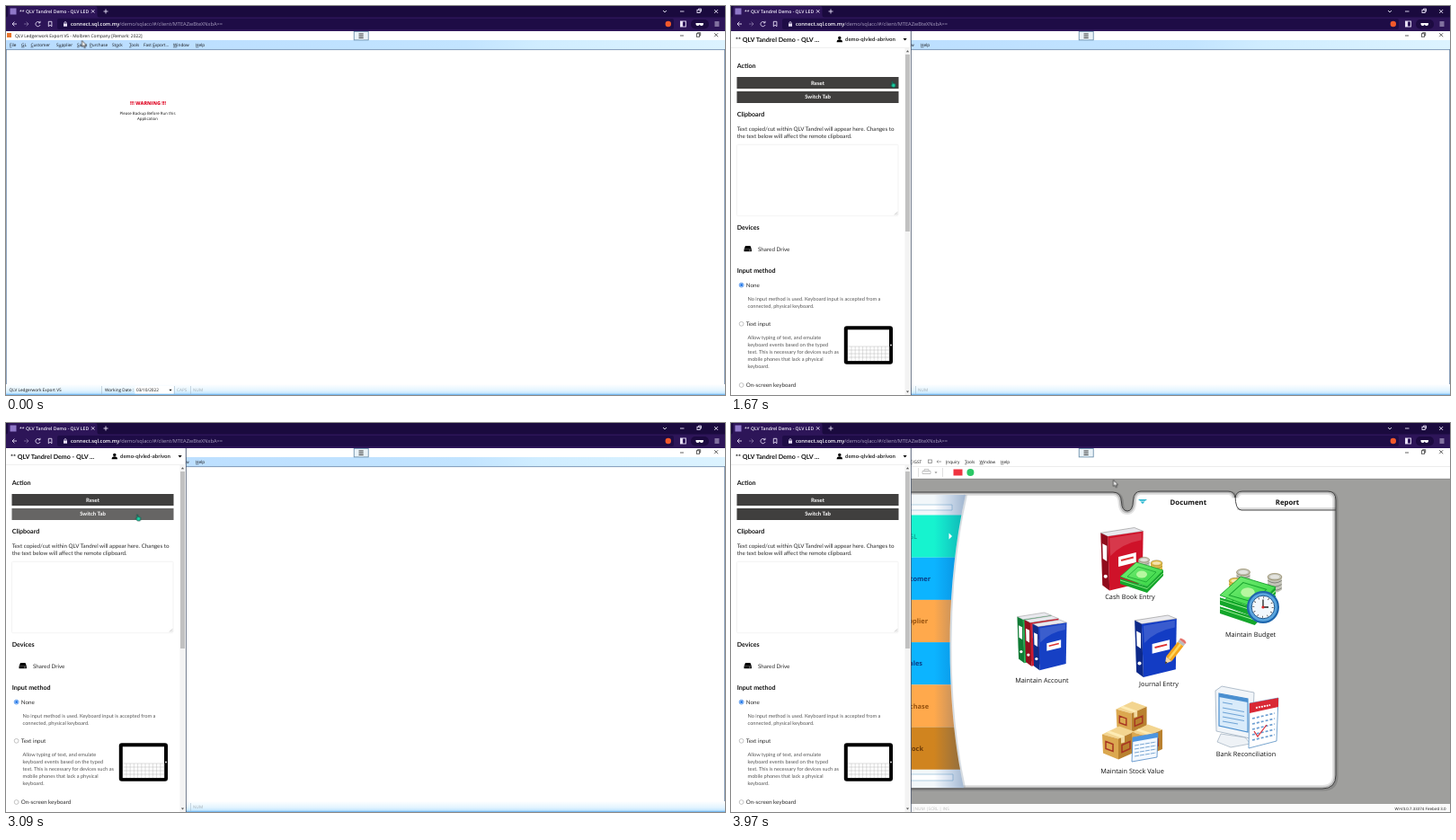
An HTML page that plays this animation: 800 by 433 pixels, repeating every 4300 ms.

```html
<!DOCTYPE html>
<html lang="en">
<head>
<meta charset="utf-8">
<title>Remote desktop demo</title>
<style>
html, body { margin: 0; width: 100%; height: 100%; overflow: hidden; background: #fff; }
svg { display: block; width: 800px; height: 433px; }
text { font-family: 'Open Sans', sans-serif; font-size: 4.7px; fill: #111; text-rendering: geometricPrecision; white-space: pre; }
.u { text-decoration: underline; text-decoration-thickness: .4px; }
.b { font-weight: 700; }
.mid { text-anchor: middle; }
.end { text-anchor: end; }
.line { fill: none; stroke: currentColor; }
#panel text { font-family: Lato, sans-serif; font-size: 6.25px; fill: #2c2c2c; }
#panel .h { font-size: 7.1px; font-weight: 700; fill: #111; }
#panel .s { font-size: 5.65px; fill: #555; }
#panel .btn { font-size: 6px; font-weight: 700; fill: #fff; text-anchor: middle; }
#desk .cap { font-size: 7.3px; text-anchor: middle; }
#desk .tab { font-size: 7.8px; font-weight: 700; text-anchor: middle; }
#desk .side { font-size: 7.4px; font-weight: 700; text-anchor: end; }

.anim { animation: 4300ms step-end infinite; }
#panel { animation-name: slide; }
#desk { animation-name: swap; }
#menuBtn { animation-name: press; }
#switch { animation-name: hover; }
#cursor { animation-name: travel; animation-timing-function: linear; }
#arrow { animation-name: arrow; }
#tealHand { animation-name: teal; }
#whiteHand { animation-name: white; }
@keyframes slide {
  0% { transform: translateX(-202px); opacity: 0; }
  28.84% { transform: translateX(-184px); opacity: .1; }
  29.53% { transform: translateX(-156px); opacity: .26; }
  30.23% { transform: translateX(-100px); opacity: .55; }
  30.93% { transform: translateX(-50px); opacity: .8; }
  32.33%, 100% { transform: none; opacity: 1; }
}
@keyframes swap { 0% { opacity: 0; } 73.95%, 100% { opacity: 1; } }
@keyframes press { 0% { fill: #eaf3f8; } 17% { fill: #bcc4d0; } 36.5%, 100% { fill: #eaf3f8; } }
@keyframes hover { 0% { fill: #403f3e; } 40.2% { fill: #666564; } 76.05%, 100% { fill: #403f3e; } }
@keyframes travel {
  0%, .7% { transform: translate(84.5px, 38.5px); }
  6% { transform: translate(260px, 60px); }
  10.2% { transform: translate(436px, 62px); }
  12.8% { transform: translate(419px, 49px); }
  22.56%, 36.05% { transform: translate(400px, 37.5px); }
  38.84% { transform: translate(177.5px, 83px); }
  41.63%, 45.12% { transform: translate(151px, 110px); }
  47.9%, 73.95% { transform: translate(144px, 101.5px); }
  80.23%, 81.16% { transform: translate(275.5px, 121.5px); }
  82.56%, 83.26% { transform: translate(290px, 122px); }
  92.3%, 100% { transform: translate(425.5px, 63.5px); }
}
@keyframes arrow { 0% { opacity: 1; } 17% { opacity: 0; } 87%, 100% { opacity: 1; } }
@keyframes teal { 0% { opacity: 0; } 17% { opacity: 1; } 76.05%, 100% { opacity: 0; } }
@keyframes white { 0% { opacity: 0; } 76.05% { opacity: 1; } 87%, 100% { opacity: 0; } }
</style>
</head>
<body>
<svg viewBox="0 0 800 433">
  <defs>
    <linearGradient id="bar"><stop stop-color="#b9dcff"/><stop offset=".64" stop-color="#c2e4ff"/><stop offset=".74" stop-color="#d0edff"/><stop offset="1" stop-color="#dcf3ff"/></linearGradient>
    <linearGradient id="foot" x2="0" y2="1"><stop stop-color="#fff"/><stop offset=".6" stop-color="#e2f4ff"/><stop offset="1" stop-color="#b4dfff"/></linearGradient>
    <linearGradient id="shade"><stop offset=".5" stop-color="#04a" stop-opacity="0"/><stop offset="1" stop-color="#037" stop-opacity=".35"/></linearGradient>
    <linearGradient id="note" x2="1" y2="1"><stop stop-color="#7df07a"/><stop offset="1" stop-color="#2fd23f"/></linearGradient>
    <path id="folder" d="M190 77H425Q434 77 434.5 88Q435 98 441 98Q447 98 447.5 86Q448 76 456 76H553Q560 76 561 83Q562 76 569 76H664Q673 76 673 86V392Q673 407 658 407H190Z"/>
    <clipPath id="inside"><use href="#folder"/></clipPath>
    <clipPath id="sideClip"><path d="M190 80H261C238 180 238 310 259 406H190Z"/></clipPath>
    <path id="handShape" d="M2 .6Q3 0 3.4 1V3.4L6.5 4.2Q7.3 4.6 7 6L6.4 9H2.7L.5 5.8Q.4 4.8 2 5.6Z"/>
    <symbol id="binder" viewBox="0 0 48 72" overflow="visible">
      <path d="M0 6 38 0 48 4 8 10Z" fill="#e9e9ee" stroke="#888" stroke-width=".6"/>
      <path d="M8 10 48 4 47 62 10 71Z" fill="currentColor"/>
      <path d="M0 6 8 10 10 71 2 65Z" fill="currentColor"/>
      <path d="M0 6 8 10 10 71 2 65Z" fill="#000" opacity=".3"/>
      <path d="M10 12 46 6V14Q24 18 11 32Z" fill="#fff" opacity=".16"/>
      <path d="M20 33 40 28V39L20 44Z" fill="#fff"/>
      <path d="M23 37 37 33.500" stroke="#d33" stroke-width="2"/>
      <path d="M2 18 7 20.500V38L2.500 35Z" fill="#fff"/>
      <circle cx="5.5" cy="55" r="2.1" fill="#fff"/>
    </symbol>
    <symbol id="cash" viewBox="0 0 48 34" overflow="visible">
      <path d="M0 18 30 27 48 9V15L30 34 0 24Z" fill="#14a62b"/>
      <path d="M0 16 18 0 48 9 30 27Z" fill="url(#note)" stroke="#14a02a" stroke-width=".7"/>
      <path d="M0 20 30 29.500 48 12" fill="none" stroke="#a5f59a" stroke-width=".8"/>
      <path d="M8 16 20 5 40 11 29 22Z" fill="none" stroke="#18a32e" stroke-width=".8"/>
      <ellipse cx="24" cy="13.500" rx="6" ry="4" fill="#b6f7a0"/>
    </symbol>
    <symbol id="coins" viewBox="0 0 15 22" overflow="visible">
      <path d="M0 4V18Q7.5 24 15 18V4Z" fill="currentColor"/>
      <path d="M0 8Q7.5 13 15 8M0 12Q7.5 17 15 12M0 16Q7.5 21 15 16" fill="none" stroke="#000" stroke-opacity=".4" stroke-width=".8"/>
      <ellipse cx="7.5" cy="4" rx="7.5" ry="3.6" fill="currentColor" stroke="#776633" stroke-width=".5"/>
      <ellipse cx="7.5" cy="4" rx="5" ry="2" fill="#fff" opacity=".55"/>
    </symbol>
    <symbol id="box" viewBox="0 0 36 38" overflow="visible">
      <path d="M0 9 19 0 36 6 18 14Z" fill="#f3d590"/>
      <path d="M0 9 18 14V37L1 30Z" fill="#dba850"/>
      <path d="M18 14 36 6V29L18 37Z" fill="#b9812f"/>
      <path d="M8 5 25 11V18L21 19V13L5 7Z" fill="#fff0bd" opacity=".8"/>
      <path d="M4 17 12 20V28L4 25ZM22 21 31 17V25L22 29Z" fill="none" stroke="#a83522" stroke-width="1.5"/>
    </symbol>
  </defs>

  <!-- application window -->
  <rect y="28" width="800" height="405" fill="#fff"/>
  <rect x="1" y="30" width="5" height="5" fill="#e8742c"/>
  <text x="10" y="35" style="font-size:4.85px">QLV Ledgerwork Export V5 - Molbren Company [Remark: 2022]</text>
  <rect y="38" width="800" height="10.5" fill="url(#bar)"/>
  <g id="menu"></g>
  <path d="M0 48.6H800M.4 48V421M799.6 48V433" class="line" color="#6482a6" stroke-width=".8"/>
  <text class="b mid" x="158" y="110" style="fill:#e0102c;font-size:5.4px;font-weight:800">!!! WARNING !!!</text>
  <text class="mid" x="157.5" y="121" style="font-size:4.4px">Please Backup Before Run this</text>
  <text class="mid" x="157.5" y="126.5" style="font-size:4.4px">Application</text>
  <rect y="421" width="800" height="12" fill="url(#foot)"/>
  <path d="M0 432.3H800" stroke="#79b9ee" stroke-width="1.2"/>
  <rect x="143.5" y="423" width="43" height="8.5" fill="#fff"/>
  <path d="M106.5 423V432M187.5 423V432M205.5 423V432" stroke="#a9bccb" stroke-width=".6"/>
  <text x="3.5" y="429">QLV Ledgerwork Export V5</text>
  <text x="110" y="429">Working Date :</text>
  <text x="145" y="429">03/10/2022</text>
  <path d="M181.5 426.7h3l-1.5 2Z"/>
  <g style="opacity:.32"><text x="190" y="429">CAPS</text><text x="208" y="429">NUM</text></g>

  <!-- second desktop -->
  <g id="desk" class="anim">
    <rect y="28" width="800" height="405" fill="#fff"/>
    <g id="deskMenu"></g>
    <g class="line" color="#888" stroke-width=".8"><rect x="219.5" y="41" width="4" height="3.5"/><path d="M229 43h5M230.5 41.5 229 43l1.5 1.5"/></g>
    <path d="M200 48.5H800" stroke="#ececec"/>
    <path d="M213 53.5h9v3h-9ZM215 51.5h5v2h-5Z" fill="none" stroke="#b5b5b5" stroke-width=".8"/>
    <path d="M226.5 54.5h3l-1.5 1.6Z" fill="#777"/>
    <path d="M208.5 50V60M235.5 50V60" stroke="#ccc" stroke-width=".6"/>
    <rect x="247.500" y="51.500" width="10" height="7" fill="#ef3340"/>
    <circle cx="266.4" cy="55" r="4" fill="#2bc866"/>
    <rect y="62" width="800" height="362" fill="#9f9f9d"/>
    <path d="M0 62.3H800" stroke="#888" stroke-width=".7"/>
    <use href="#folder" transform="translate(1 1)" fill="none" stroke="#555" stroke-opacity=".3" stroke-width="3"/>
    <use href="#folder" fill="#fff" stroke="#484848" stroke-width="1"/>
    <g clip-path="url(#inside)" fill="none" stroke="#222">
      <use href="#folder" stroke-opacity=".12" stroke-width="8"/>
      <use href="#folder" stroke-opacity=".22" stroke-width="4.500"/>
      <path d="M561 80Q561 97 568 97H673" stroke="#484848"/>
      <path d="M563 95.500H673" stroke-opacity=".15" stroke-width="3"/>
    </g>
    <path d="M261 80C238 180 238 310 259 406" fill="none" stroke="#7c8d9b" stroke-opacity=".3" stroke-width="4"/>
    <g clip-path="url(#sideClip)">
      <rect x="190" y="80" width="72" height="327" fill="#f2f7fa"/>
      <path d="M190 91H246V97H190M190 391H247V398H190" fill="#fff" stroke="#9fc4dc" stroke-width=".8"/>
      <g id="sides"></g>
      <rect x="190" y="80" width="72" height="327" fill="url(#shade)"/>
    </g>
    <path d="M242.5 122.5 246 126l-3.5 3.5Z" fill="#fff"/>
    <path d="M453 85h10l-2.2 1.7h-5.6ZM455.5 87.5h5L458 90Z" fill="#27b6cf"/>
    <text class="tab" x="508.8" y="91">Document</text>
    <text class="tab" x="619" y="91">Report</text>

    <use href="#binder" x="411" y="116.5" width="48" height="71" color="#cf1229"/>
    <use href="#coins" x="453" y="149" width="13" height="18" color="#c4c4b8"/>
    <use href="#coins" x="467" y="152" width="13" height="20" color="#e8c24e"/>
    <use href="#cash" x="433" y="155" width="48" height="34"/>

    <use href="#coins" x="562" y="162" width="16" height="22" color="#c4c4b8"/>
    <use href="#coins" x="597" y="167" width="16" height="23" color="#c4c4b8"/>
    <use href="#coins" x="554" y="172" width="14" height="20" color="#e8c24e"/>
    <use href="#cash" x="544" y="181" width="62" height="44"/>
    <use href="#cash" x="544" y="171" width="62" height="44"/>
    <circle cx="592" cy="205" r="18" fill="#1f66ac"/>
    <circle cx="592" cy="205" r="15.8" fill="#5aa6df"/>
    <circle cx="592" cy="205" r="12.8" fill="#f2f8fd" stroke="#22588c"/>
    <circle cx="592" cy="205" r="10.7" fill="none" stroke="#444" stroke-width="2" stroke-dasharray=".8 4.802"/>
    <path d="M592 196.5V205H598" class="line" color="#222" stroke-width="1.3"/>
    <circle cx="592" cy="205" r="1.6" fill="#d22"/>

    <use href="#binder" x="318.5" y="211" width="38" height="57" color="#17b04c"/>
    <use href="#binder" x="326.5" y="214.5" width="38" height="57" color="#d0182f"/>
    <use href="#binder" x="335.5" y="219" width="38" height="57" color="#1640c4"/>

    <use href="#binder" x="449" y="214" width="47" height="70" color="#133cc4"/>
    <g transform="translate(483 268) rotate(-52)">
      <path d="M0 0 7-4V4Z" fill="#f5d5a0"/><path d="M0 0 2.5-1.4V1.4Z" fill="#222"/>
      <path d="M7-4H28V4H7Z" fill="#f5a61d"/><path d="M7-1.3H28V1.2H7Z" fill="#ffd75c"/>
      <path d="M28-4h3V4H28Z" fill="#bbb"/><path d="M31-4h2q2 4 0 8h-2Z" fill="#e5726b"/>
    </g>

    <use href="#box" x="428" y="310" width="35" height="36"/>
    <use href="#box" x="413" y="337" width="36" height="39"/>
    <use href="#box" x="446" y="335" width="34" height="37"/>
    <path d="M447 350 475 345 474 372 446 377Z" fill="#f4f9ff" stroke="#4d87c4" stroke-width=".8"/>
    <path d="M447 350 475 345V350L447 355Z" fill="#4c95e0"/>
    <path d="M449 359 473 355M449 363 473 359M449 367 473 363M449 371 473 367" stroke="#7ba7d2" stroke-width="1" stroke-dasharray="5 1"/>

    <path d="M545 346 572 350 578 357 556 361 541 355Z" fill="#eef2f6" stroke="#8ea0b2" stroke-width=".6"/>
    <path d="M539 298 546 293 582 300 580 352 573 350 540 343Z" fill="#f1f5f9" stroke="#91a4b7" stroke-width=".7"/>
    <path d="M543 301 575 307V344L543 337Z" fill="#d9ebfa" stroke="#4a8fd0" stroke-width="1.200"/>
    <path d="M543 301 575 307V311L543 305Z" fill="#4a8fd0"/>
    <path d="M547 311 558 313M547 317 571 321.500M547 322 571 326.500M547 327 571 331.500M547 332 564 335" stroke="#6fa4d6" stroke-width="1.200"/>
    <path d="M577 312 609 306 607 354 576 362Z" fill="#fff" stroke="#6a9cca" stroke-width=".9"/>
    <path d="M577 312 609 306V316L577 323Z" fill="#d92834"/>
    <path d="M584 317 600 314" stroke="#fff" stroke-width="1.8" stroke-dasharray="2 1"/>
    <path d="M580 329 605 323M580 335 605 329M580 341 605 335M580 347 605 341M580 353 605 347" stroke="#6d9fd2" stroke-width="1.700" stroke-dasharray="3 2"/>
    <path d="M582 343 586 349 596 336" class="line" color="#d92834" stroke-width="1.2"/>
    <g id="caps"></g>
    <rect y="424" width="800" height="9" fill="#fbfbfb"/>
    <text x="202" y="430.5" style="fill:#bbb">|NUM |SCRL | INS</text>
    <text class="end" x="795.5" y="430.5" style="font-size:4.4px">WI-V3.0.7.33374 Firebird 3.0</text>
  </g>

  <!-- window controls -->
  <rect id="menuBtn" class="anim" x="387.2" y="28.4" width="16" height="9.5" stroke="#5d84a2" stroke-width=".8"/>
  <path d="M392.5 31h5.2M392.5 33.2h5.2M392.5 35.4h5.2" stroke="#222" stroke-width=".9"/>
  <g class="line" color="#222" stroke-width=".7"><path d="M750 33h4M788.2 30.2l4 4m0-4-4 4M769.5 30.6v-.9h3.2v3.2h-.9"/><rect x="768.3" y="30.8" width="3.4" height="3.4"/></g>

  <!-- side panel -->
  <g id="panel" class="anim">
    <rect y="28" width="200" height="405" fill="#fff"/>
    <path d="M200.3 28V433" stroke="#47536a" stroke-width=".9"/>
    <path d="M0 46.5H200" stroke="#ececec" stroke-width=".8"/>
    <text class="h" x="5" y="39.5">** QLV Tandrel Demo - QLV ...</text>
    <circle cx="120.8" cy="35.4" r="1.7"/><path d="M117.6 40.2q0-3 3.2-3t3.2 3Z"/>
    <text class="b" x="127" y="39.3" style="font-size:6px">demo-qlvled-abrivon</text>
    <path d="M191.5 36h4.2l-2.1 2.6Z"/>
    <rect x="193.5" y="47" width="6.2" height="386" fill="#f3f3f3"/>
    <rect x="194" y="54" width="5" height="197" fill="#c1c1c1"/>
    <path d="M194.9 51.3h3.2l-1.6-2ZM194.9 428.5h3.2l-1.6 2Z" fill="#555"/>
    <text class="h" x="6.7" y="68.6">Action</text>
    <rect x="6.5" y="79" width="180" height="13" fill="#403f3e"/>
    <rect id="switch" class="anim" x="6.5" y="95" width="180" height="13"/>
    <text class="btn" x="96.5" y="87.5">Reset</text>
    <text class="btn" x="96.5" y="103.3">Switch Tab</text>
    <text class="h" x="6.7" y="123">Clipboard</text>
    <text x="6.7" y="139">Text copied/cut within QLV Tandrel will appear here. Changes to</text>
    <text x="6.7" y="147">the text below will affect the remote clipboard.</text>
    <rect x="6.5" y="154.3" width="179.5" height="79.4" rx="1" fill="#fff" stroke="#f0f0f0" stroke-width=".8"/>
    <path d="M182 232.5 185.2 229.3M184 232.5 185.2 231.3" stroke="#888" stroke-width=".5"/>
    <text class="h" x="6.7" y="249.3">Devices</text>
    <path d="M16 267h5.5l1.3 3.3H14.7ZM14.5 270.6h8.4v2.6H14.5Z"/><path d="M20 272h1.8" stroke="#fff" stroke-width=".6"/>
    <text x="30" y="272.6">Shared Drive</text>
    <text class="h" x="6.7" y="296.5">Input method</text>
    <g id="radios"></g>
    <g id="hints"></g>
    <rect x="125.8" y="356.3" width="54.2" height="42.4" rx="3"/>
    <rect x="129.8" y="360.3" width="46.2" height="34.8" fill="#fff"/>
    <path id="keys" fill="none" stroke="#bbb" stroke-width=".5"/>
    <circle cx="178" cy="377.5" r=".9" fill="#fff"/>
  </g>

  <!-- browser frame -->
  <rect width="800" height="13" fill="#1a0a3e"/>
  <path d="M0 12.5Q2 12.5 2 10V2Q2 0 4 0H99Q101.5 0 101.5 2V10Q101.5 12.5 104 12.5H800V28H0Z" fill="#2d1558"/>
  <rect x="57" y="14" width="686" height="12" rx="2" fill="#1e0c46"/>
  <rect x="4.5" y="2.5" width="7" height="7" fill="#8f78c8"/>
  <text class="b" x="15" y="8" style="fill:#f3effc;font-size:5.1px;font-weight:600">** QLV Tandrel Demo - QLV LED</text>
  <g class="line" color="#e8e0f8" stroke-width=".9">
    <path d="M95 4.2l3.4 3.4m0-3.4-3.4 3.4M108.5 6h5M111 3.5v5M731 5l2 2 2-2M750 6h4.5M788.2 4l4 4m0-4-4 4M770.5 4v-.9h3v3h-.9"/>
    <rect x="769" y="4.3" width="3.2" height="3.2"/>
    <path d="M12 20H7m2.4-2.4L7 20l2.4 2.4"/>
    <path d="M20 20h5m-2.4-2.4L25 20l-2.4 2.4" opacity=".4"/>
    <path d="M37.5 18.4A2.6 2.6 0 1 0 38 21M38 16.8v2h-2"/>
    <path d="M47.3 17.3h3.6v5.5l-1.8-1.6-1.8 1.6Z"/>
    <path d="M64.8 19.5v-1q1.2-2 2.4 0v1"/>
    <rect x="750.5" y="17" width="6" height="6"/>
    <path d="M788.5 18h5M788.5 20h5M788.5 22h5"/>
  </g>
  <path d="M64 19.5h4v3.2h-4ZM750.5 17h2.5v6h-2.5Z" fill="#e8e0f8"/>
  <text x="72" y="22" style="fill:#a99fc0;font-size:5.65px"><tspan style="fill:#fff;font-weight:600">connect.sql.com.my</tspan>/demo/sqlacc/#/client/MTEAZwBteXNxbA==</text>
  <circle cx="736.8" cy="20" r="3.2" fill="#f2592b"/>
  <rect x="762" y="15" width="20" height="10.5" rx="5" fill="#1c0a40"/>
  <path d="M767.5 19h8.5q.3 3-2 3-1.7 0-2.2-1.5-.6 1.5-2.3 1.5-2.2 0-2-3Z" fill="#fff"/>

  <g id="cursor" class="anim">
    <path id="arrow" class="anim" d="M0 0V7L1.7 5.6 2.8 8.2 4 7.7 2.9 5.2H5Z" fill="#fff" stroke="#222" stroke-width=".7"/>
    <g id="tealHand" class="anim"><use href="#handShape" transform="scale(.82)" fill="#19d3a4" stroke="#123c38" stroke-width=".8"/></g>
    <g id="whiteHand" class="anim"><use href="#handShape" fill="#fafafa" stroke="#444" stroke-width=".8"/></g>
  </g>
</svg>
<script>
const $ = id => document.getElementById(id);
const label = (s, x, y, cls = '', style = '') =>
  `<text x="${x}" y="${y}" class="${cls}" style="${style}">${s}</text>`;
const fill = (id, items, draw) => { $(id).innerHTML = items.map(draw).join(''); };

// "_" marks the underlined access key
const menuItem = ([s, x]) => label(s.replace(/_(.)/, '<tspan class="u">$1</tspan>'), x, 44.7);
fill('menu', [['_File', 4], ['_GL', 17], ['_Customer', 27.5], ['S_upplier', 56], ['_Sales', 79],
  ['_Purchase', 93], ['St_ock', 118], ['_Tools', 137], ['Fast _Export...', 153],
  ['_Window', 186], ['_Help', 211]], menuItem);
fill('deskMenu', [['SS_T/GST', 194], ['_Inquiry', 239], ['_Tools', 260], ['_Window', 276.5], ['_Help', 300]], menuItem);

fill('sides', [['GL', 207, '#16f3cf', '#0a8b83'], ['Customer', 222, '#0cb4ff', '#0a3e86'],
  ['Supplier', 219, '#ffa94c', '#96520f'], ['Sales', 213, '#0cb4ff', '#0a3e86'],
  ['Purchase', 220, '#ffa94c', '#96520f'], ['Stock', 214, '#d0841f', '#6b3a08']],
  ([s, x, back, ink], i) => {
    const y = 102.5 + i * 47.2;
    return `<rect x="190" y="${y}" width="72" height="47.2" fill="${back}"/>` +
      label(s, x, y + 26.2, 'side', `fill:${ink};${i ? '' : 'font-weight:400'}`);
  });

fill('caps', [['Cash Book Entry', 444, 196], ['Maintain Budget', 578, 237.5], ['Maintain Account', 345.8, 288.7],
  ['Journal Entry', 476, 293], ['Bank Reconciliation', 573, 371.3], ['Maintain Stock Value', 446.5, 390]],
  ([s, x, y]) => label(s, x, y, 'cap'));

fill('radios', [['None', 310.6], ['Text input', 353.8], ['On-screen keyboard', 422]], ([s, y], i) =>
  `<circle cx="11.6" cy="${y}" r="2.4" fill="#fff" stroke="${i ? '#aaa' : '#1a73e8'}" stroke-width=".7"/>` +
  (i ? '' : `<circle cx="11.6" cy="${y}" r="1.5" fill="#1a73e8"/>`) + label(s, 16.8, y + 2.2));

const hint = (y, lines) => lines.map((s, i) => [s, y + i * 8.1]);
fill('hints', [
  ...hint(327.5, ['No input method is used. Keyboard input is accepted from a', 'connected, physical keyboard.']),
  ...hint(370.8, ['Allow typing of text, and emulate', 'keyboard events based on the typed',
    'text. This is necessary for devices such as', 'mobile phones that lack a physical', 'keyboard.'])
], ([s, y]) => label(s, 18.5, y, 's'));

let keys = '';
for (let y = 379; y < 395; y += 4) keys += `M130 ${y}H176`;
for (let x = 134; x < 176; x += 4.2) keys += `M${x} 379V395`;
$('keys').setAttribute('d', keys);
</script>
</body>
</html>
```
